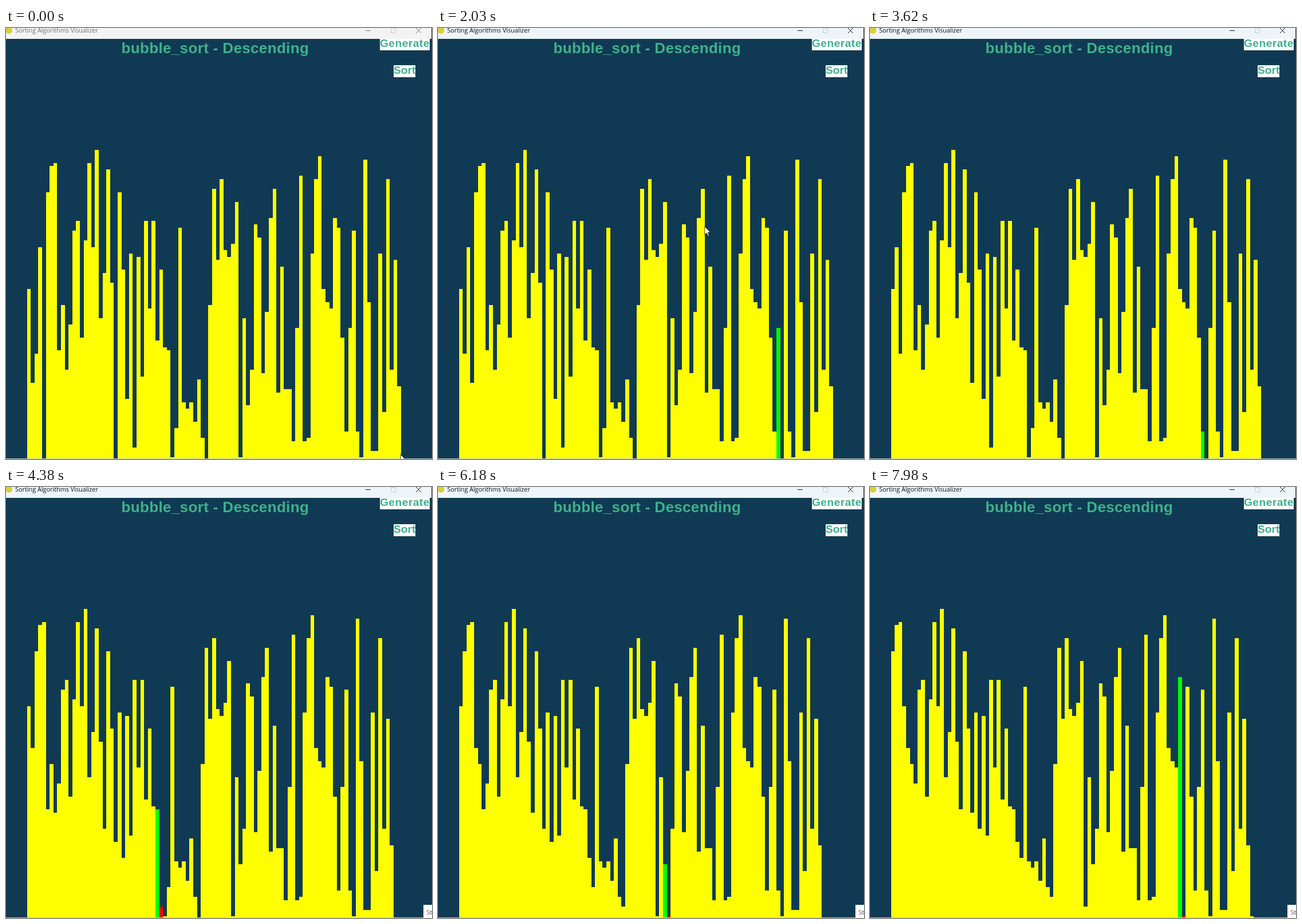
Write an HTML page with a canvas that moves like this. It is 744 by 753 pixels and loops after 8 s.

```html
<!DOCTYPE html>
<html lang="en">
<head>
<meta charset="utf-8">
<title>Sorting Algorithms Visualizer</title>
<style>
  html, body { margin: 0; width: 100%; height: 100%; overflow: hidden; background: #103a53; }
  canvas { display: block; }
</style>
</head>
<body>
<canvas id="stage" width="744" height="753"></canvas>
<script>
const ctx = document.getElementById('stage').getContext('2d');
const LOOP = 8000;
const NAVY = '#103a53', TEAL = '#3eb18c', YELLOW = '#ffff00', GREEN = '#00ff00', RED = '#ff0000';
const HEADING_FONT = '"Liberation Sans", Arial, sans-serif';
const WINDOW_FONT = '"Open Sans", sans-serif';
const FLOOR = 752, UNIT = 5.65, BAR = 6.6, LEFT = 36.6;

const values = [
  53, 24, 33, 66, 0, 83, 91, 92, 34, 48, 28, 42, 71, 74, 38, 68, 92, 66, 96, 44,
  58, 90, 55, 0, 83, 59, 19, 64, 4, 63, 26, 74, 47, 74, 37, 59, 35, 34, 1, 10,
  72, 18, 16, 18, 12, 25, 7, 0, 48, 84, 62, 87, 65, 63, 67, 80, 1, 44, 17, 28,
  73, 69, 27, 46, 75, 84, 21, 60, 22, 22, 6, 41, 88, 6, 7, 64, 87, 94, 53, 49,
  47, 75, 72, 38, 9, 41, 71, 9, 1, 93, 49, 3, 3, 64, 15, 87, 28, 62, 23
];

// Descending bubble sort, stopped after a number of swaps.
function sortState(swaps) {
  const list = values.slice();
  let done = 0;
  if (swaps <= 0) return { list, active: -9 };
  for (let end = list.length - 1; end > 0; end--) {
    for (let j = 0; j < end; j++) {
      if (list[j] >= list[j + 1]) continue;
      [list[j], list[j + 1]] = [list[j + 1], list[j]];
      if (++done === swaps) return { list, active: j };
    }
  }
  return { list, active: -9 };
}

// The screen refreshes every 69.1 ms, four swaps at a time with two small catch-ups.
function swapsAt(t) {
  const tick = Math.floor((t - 1268) / 69.1);
  return 37 + 4 * tick + (tick > 58) + (tick > 78);
}

function rect(x, y, w, h, color) {
  ctx.fillStyle = color;
  ctx.fillRect(x, y, w, h);
}

function text(str, x, y, font, color, spacing = 0) {
  ctx.font = font;
  ctx.letterSpacing = spacing + 'px';
  ctx.fillStyle = color;
  ctx.fillText(str, x, y);
}

function line(color, ...points) {
  ctx.strokeStyle = color;
  ctx.lineWidth = 1;
  ctx.beginPath();
  for (let i = 0; i < points.length; i += 4) {
    ctx.moveTo(points[i], points[i + 1]);
    ctx.lineTo(points[i + 2], points[i + 3]);
  }
  ctx.stroke();
}

function drawBars({ list, active }) {
  list.forEach((value, i) => {
    const x = Math.round(LEFT + i * BAR), right = Math.round(LEFT + (i + 1) * BAR);
    const top = Math.round(755.5 - value * UNIT);
    const color = i === active ? GREEN : i === active + 1 ? RED : YELLOW;
    if (top < FLOOR) rect(x, top, right - x, FLOOR - top, color);
  });
}

function drawTitleBar(focused) {
  const ink = focused ? '#111' : '#707070';
  rect(0, 0, 743, 19, focused ? '#eef4fa' : '#f3f3f3');
  ctx.fillStyle = '#d9cf3c';
  ctx.beginPath();
  ctx.arc(5, 4, 6, 0, Math.PI * 2);
  ctx.fill();
  text('Sorting Algorithms Visualizer', 16, 8, '10.85px ' + WINDOW_FONT, ink);
  line(ink, 628, 4.5, 637, 4.5, 716, 0, 725, 9, 725, 0, 716, 9);
  ctx.strokeStyle = '#c6c9cc';
  ctx.strokeRect(672.5, 0.5, 8, 8);
}

function drawLabels() {
  const button = 'bold 19.2px ' + HEADING_FONT;
  text('bubble_sort - Descending', 201.5, 44, 'bold 26px ' + HEADING_FONT, TEAL, 0.35);
  rect(653, 19, 87, 20, '#fff');
  text('Generate', 653, 33, button, TEAL, 0.45);
  rect(677, 65, 38, 21, '#fff');
  text('Sort', 677, 80, button, TEAL);
}

const ease = p => p * p * (3 - 2 * p);

function glide(t, start, end, from, to) {
  const p = ease(Math.min(1, Math.max(0, (t - start) / (end - start))));
  return from.map((v, i) => v + (to[i] - v) * p);
}

function drawCursor(t) {
  const rest = [464, 344];
  const [x, y] = t < 1800 ? glide(t, 70, 480, [689, 745], rest)
                          : glide(t, 2000, 2650, rest, [746, 760]);
  const outline = [[0, 0], [0, 14.5], [3.3, 11.5], [5.7, 16.5], [7.8, 15.5], [5.5, 10.5], [9.5, 10]];
  ctx.beginPath();
  outline.forEach(([dx, dy]) => ctx.lineTo(x + dx, y + dy));
  ctx.closePath();
  ctx.fillStyle = '#fff';
  ctx.fill();
  ctx.strokeStyle = '#111';
  ctx.lineWidth = 0.8;
  ctx.stroke();
}

function draw(now) {
  const t = now % LOOP;
  rect(0, 0, 744, 753, NAVY);
  drawBars(sortState(swapsAt(t)));
  drawTitleBar(t >= 480);
  drawLabels();
  rect(0, FLOOR, 744, 1, '#c3ccd2');
  drawCursor(t);
  if (t >= 4310) {
    rect(729, 730, 15, 23, '#fff');
    text('St', 734.5, 747, '11px ' + WINDOW_FONT, '#555');
  }
  requestAnimationFrame(draw);
}
requestAnimationFrame(draw);
</script>
</body>
</html>
```
